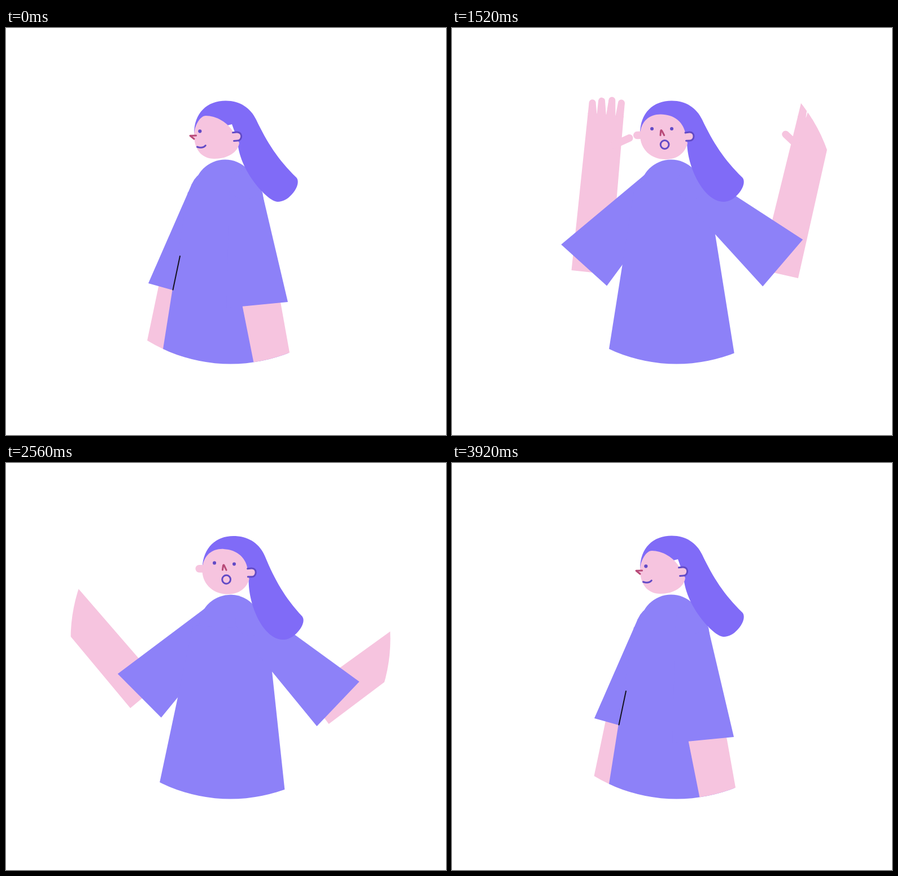
Animation, 779 px wide and 719 px high, one loop 4.4 s. Source, as an HTML page with a canvas:

```html
<!DOCTYPE html>
<html lang="en">
<head>
<meta charset="utf-8">
<title>Waving woman</title>
<style>
  html, body { margin: 0; width: 100%; height: 100%; overflow: hidden; background: #fff; }
  canvas { display: block; }
</style>
</head>
<body>
<canvas id="stage" width="779" height="719"></canvas>
<script>
const ctx = document.getElementById('stage').getContext('2d');
const SKIN = '#f6c4df', SHIRT = '#8d81f8', HAIR = '#806bf7', INK = '#624ac6', NOSE = '#b84a78';
const LOOP = 4400, STEP = 80;
const rad = d => d * Math.PI / 180;

// Linear interpolation through [step, value] pairs, clamped at both ends.
function track(keys, n) {
  if (n <= keys[0][0]) return keys[0][1];
  for (let i = 1; i < keys.length; i++) {
    const [a, from] = keys[i - 1], [b, to] = keys[i];
    if (n <= b) return from + (to - from) * (n - a) / (b - a);
  }
  return keys[keys.length - 1][1];
}

const bendKeys = (rest, a, b) => [[8, rest], [14, a], [19, b], [24.5, a], [30, b], [36, rest]];
const LIFT = [[8, 0], [14, 1], [36, 1], [43, 0]];
const SLIDE = [[8, -1.6], [14, 11], [28, 0]];

const LEFT = {
  side: 1, shoulder: [368, 292], cap: 42.4, lift: 26.5, elbow: [310, 464], corner: [-30, 2],
  sleeve: [[329.2, 275], [252, 451], [357, 480.3], [390, 292]],
  bend: bendKeys(167, 39, 20.5)
};
const RIGHT = {
  side: -1, shoulder: [423, 277], cap: 26.5, lift: 43.8, elbow: [460.2, 462.2], corner: [46.5, 48],
  sleeve: [[448.8, 271], [499, 484], [390.5, 494.6], [395.5, 285]],
  bend: bendKeys(168.7, 26, 56.5)
};

function poly(points, color) {
  ctx.beginPath();
  points.forEach(p => ctx.lineTo(...p));
  ctx.closePath();
  ctx.fillStyle = color;
  ctx.fill();
}

function disc(x, y, r, color) {
  ctx.beginPath();
  ctx.arc(x, y, r, 0, 7);
  ctx.fillStyle = color;
  ctx.fill();
}

function fill(d, color) {
  ctx.fillStyle = color;
  ctx.fill(new Path2D(d));
}

function line(d, color, width = 3) {
  ctx.strokeStyle = color;
  ctx.lineWidth = width;
  ctx.stroke(new Path2D(d));
}

function rotateAt(x, y, deg) {
  ctx.translate(x, y);
  ctx.rotate(rad(deg));
  ctx.translate(-x, -y);
}

// Forearm and hand, drawn upwards from the outer elbow corner.
function forearm() {
  poly([[0, 0], [0, 280], [63.4, 280], [69, 0]], SKIN);
  const roots = [0, 16, 32.5, 49, 63.4], tips = [[6, 298], [22, 303], [40, 306], [57, 303]];
  tips.forEach(([x, y], i) => {
    poly([[roots[i], 278], [x - 6, y], [x + 6, y], [roots[i + 1], 278]], SKIN);
    disc(x, y, 6, SKIN);
  });
  line('M52 228L77.5 243', SKIN, 13);
}

function arm(a, n) {
  const slide = a === LEFT ? track(SLIDE, n) : 0;
  ctx.save();
  rotateAt(...a.shoulder, a.side * a.lift * track(LIFT, n));
  ctx.save();
  ctx.translate(a.elbow[0] + slide * .85, a.elbow[1] + slide);
  ctx.rotate(rad(-a.side * track(a.bend, n)));
  ctx.translate(...a.corner);
  ctx.scale(a.side, -1);
  forearm();
  ctx.restore();
  poly(a.sleeve, SHIRT);
  disc(...a.shoulder, a.cap, SHIRT);
  ctx.restore();
}

function torso(showSeam) {
  disc(388, 287.5, 55, SHIRT);
  poly([[322, 290], [269.6, 620], [507, 620], [454, 290]], SHIRT);
  if (showSeam) line('M308 403L295.5 462.5', '#15131f', 2);
}

function hair(inner) {
  fill('M333 187C333 150 356 128.5 389 128.5C414 128.5 433 141 443 162C462 202 482 233 514 264' +
    'C521 272 513 287 506 294C499 302 490 307 481 307' + inner + 'L400 170Z', HAIR);
}

function frontHead(open) {
  hair('C446 307 416 246 416 200');
  line('M327.7 189.5L342 189', SKIN, 13.5);
  fill('M333 189C333 214 352 232 378 232C398 232 412 222 417 204L414 190' +
    'C411 166 393 152.5 369 152.5C350 152.5 334 164 333 189Z', SKIN);
  const ear = 'M413 185L420 184C431 183 430 199 421 199L414.5 199.3';
  fill(ear, SKIN);
  line(ear, INK);
  disc(354, 178, 3, INK);
  disc(389, 178, 3, INK);
  line('M369 189.5L369.7 181.5Q370.3 179.5 371.5 181.5L375.7 189.5', NOSE);
  line(open ? 'M369.2 206a7.4 7.4 0 1 0 14.8 0a7.4 7.4 0 1 0 -14.8 0' : 'M366.5 202.6Q378 208.5 388.5 201', INK);
}

function sideHead() {
  hair('C463 307 411 250 410 198');
  fill('M333 189C333 213 345 231 369 231C393 231 411 219 413 203L409 196L404 187' +
    'C394 166 371 155 354 155C343 155 333 174 333 189Z', SKIN);
  const ear = 'M401.5 184.8L408 184C419.5 183 419 198.5 410 199L403.5 199.5';
  fill(ear, SKIN);
  line(ear, INK);
  disc(343.3, 182.3, 3.1, INK);
  const nose = 'M336.5 190L326 190.3L333 196';
  fill(nose, SKIN);
  line(nose, NOSE);
  line('M338.5 210Q348 213.5 353.3 207.5', INK);
}

function draw(time) {
  const n = Math.floor(time % LOOP / STEP);
  const beat = (n - 11) % 8;
  const lean = n > 11 && n < 43 ? 4 - Math.abs(beat - 4) : 0;

  ctx.fillStyle = '#fff';
  ctx.fillRect(0, 0, 779, 719);
  ctx.lineCap = ctx.lineJoin = 'round';
  ctx.save();
  ctx.beginPath();
  ctx.arc(397.5, 310.5, 283, 0, 7);
  ctx.clip();
  rotateAt(388, 464, lean);
  arm(LEFT, n);
  torso(track(LIFT, n) < .6);
  arm(RIGHT, n);
  if (n >= 9 && n < 49) frontHead(n >= 15);
  else sideHead();
  ctx.restore();
}

const start = performance.now();
function tick() {
  draw(performance.now() - start);
  requestAnimationFrame(tick);
}
tick();
</script>
</body>
</html>
```
